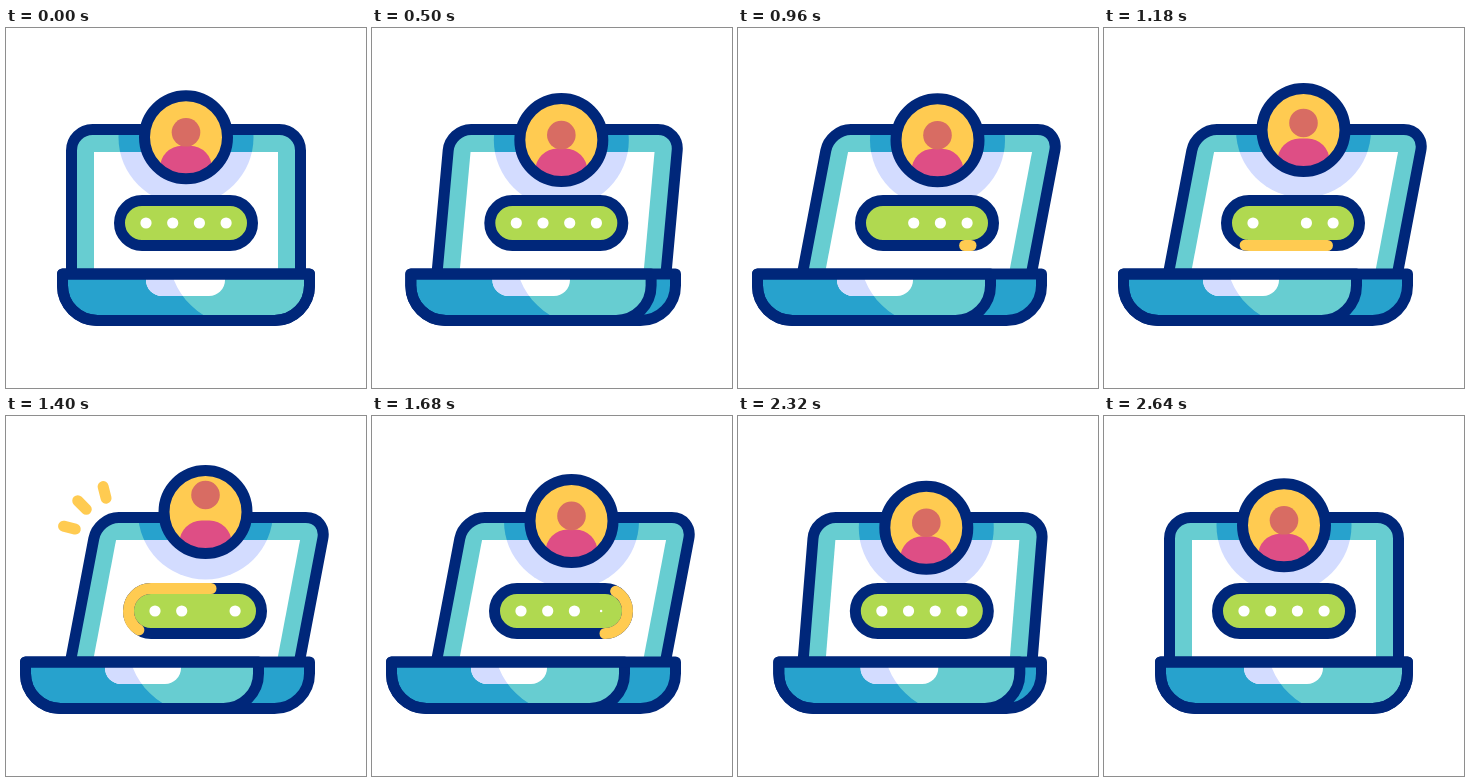
Recreate the animation shown at these times as an HTML page with a canvas. Size 360x360 px, loop 3 s.

```html
<!DOCTYPE html>
<html lang="en">
<head>
<meta charset="utf-8">
<title>Laptop login</title>
<style>
  html, body { margin: 0; height: 100%; overflow: hidden; background: #fff; }
  canvas { display: block; }
</style>
</head>
<body>
<canvas width="360" height="360"></canvas>
<script>
const ctx = document.querySelector('canvas').getContext('2d');
const LOOP = 3000, LINE = 11;
const navy = '#00277a', teal = '#67cdd1', blue = '#27a2cd', lilac = '#d3dcff',
      yellow = '#ffcb51', green = '#b0d950', pink = '#de4e85', coral = '#d86c63';

// Eased progress from 0 to 1 between two times
function ease(t, from, to) {
  const x = Math.min(1, Math.max(0, (t - from) / (to - from)));
  return x * x * (3 - 2 * x);
}
const bump = (t, from, peak, to) => ease(t, from, peak) - ease(t, peak, to);

function fill(path, color) {
  ctx.fillStyle = color;
  ctx.fill(path);
}
function stroke(path, color = navy) {
  ctx.strokeStyle = color;
  ctx.stroke(path);
}
function clipped(path, draw) {
  ctx.save();
  ctx.clip(path);
  draw();
  ctx.restore();
}
function circle(x, y, r) {
  const path = new Path2D();
  path.arc(x, y, r, 0, Math.PI * 2);
  return path;
}
function box(x, y, w, h, radius = 0) {
  const path = new Path2D();
  path.roundRect(x, y, w, h, radius);
  return path;
}
function skewed(path, slope) {
  const result = new Path2D();
  result.addPath(path, new DOMMatrix([1, 0, -slope, 1, slope * 240, 0]));
  return result;
}

function drawScreen(turn, avatar) {
  const lid = skewed(box(65.5, 101.5, 229, 170, 21), 0.19 * turn);
  const screen = skewed(box(88, 124, 184, 122), 0.19 * turn);
  const shadow = circle(avatar.x, avatar.y, 67.5);
  clipped(box(0, 0, 360, 246), () => {
    fill(lid, teal);
    clipped(lid, () => fill(shadow, blue));
    fill(screen, '#fff');
    clipped(screen, () => fill(shadow, lilac));
    stroke(lid);
  });
}

function drawBase(turn) {
  const left = 56.5 - 37 * turn, shift = -41 * turn;
  const tray = right => box(left, 246, right - left, 46.5, [0, 0, 35, 35]);
  const front = tray(303.5 - 51 * turn);
  const pad = box(140 + shift, 246, 79 - 3 * turn, 22, [0, 0, 16, 16]);
  const shade = new Path2D(`M0 246H${166 + shift}c5 18 18 35 40 46H0Z`);
  const outer = tray(303.5);
  fill(outer, blue);
  fill(front, teal);
  clipped(front, () => {
    fill(shade, blue);
    fill(pad, '#fff');
    clipped(shade, () => fill(pad, lilac));
  });
  stroke(front);
  stroke(outer);
}

function drawField(t, turn) {
  ctx.save();
  ctx.translate(9 * turn, 0);
  const pill = box(113.5, 172.5, 133, 45, 22.5);
  fill(pill, green);
  stroke(pill);
  for (let i = 0; i < 4; i++) {
    const blink = 960 + 220 * i;
    const r = 5.6 * (1 - bump(t, blink - 200, blink, blink + 200));
    fill(circle(140 + 26.7 * i, 195, r), '#fff');
  }
  // Highlight running clockwise round the outline
  const length = 176 + Math.PI * 45;
  const head = length * ease(t, 893, 1702), tail = length * ease(t, 1097, 1906);
  if (head - tail > 0.5) {
    ctx.setLineDash([head - tail, length * 2]);
    ctx.lineDashOffset = -tail;
    stroke(new Path2D('M224 217.5H136a22.5 22.5 0 0 1 0-45H224a22.5 22.5 0 0 1 0 45'), yellow);
  }
  ctx.restore();
}

function drawAvatar(t, { x, y }) {
  const disc = circle(x, y, 41.5);
  fill(disc, yellow);
  clipped(disc, () => {
    fill(box(x - 26, y + 8.5, 52, 50, 22), pink);
    fill(circle(x, y - 5 - 12 * bump(t, 1100, 1400, 1700), 14.3), coral);
  });
  stroke(disc);
}

function drawSparks(t) {
  const head = 40 * ease(t, 1250, 1600), tail = 40 * ease(t, 1334, 1684);
  if (head - tail < 0.5) return;
  for (const [x, y, degrees] of [[73, 114, 194], [83, 96, 225], [101, 86, 256]]) {
    const angle = degrees * Math.PI / 180, dx = Math.cos(angle), dy = Math.sin(angle);
    const ray = new Path2D();
    ray.moveTo(x + dx * tail, y + dy * tail);
    ray.lineTo(x + dx * head, y + dy * head);
    stroke(ray, yellow);
  }
}

function draw(now) {
  const t = now % LOOP;
  const turn = bump(t, 200, 820, 1980) - 0 === 1 ? 1 : ease(t, 200, 820) - ease(t, 1980, 2600);
  const avatar = {
    x: 180 + 19.5 * turn,
    y: 109.3 + 5.7 * turn - 19 * bump(t, 820, 1400, 1980)
  };
  ctx.fillStyle = '#fff';
  ctx.fillRect(0, 0, 360, 360);
  ctx.lineWidth = LINE;
  ctx.lineCap = ctx.lineJoin = 'round';
  drawScreen(turn, avatar);
  drawBase(turn);
  drawField(t, turn);
  drawAvatar(t, avatar);
  drawSparks(t);
  requestAnimationFrame(animate);
}
const start = performance.now();
function animate() {
  draw(performance.now() - start);
}
animate();
</script>
</body>
</html>
```
